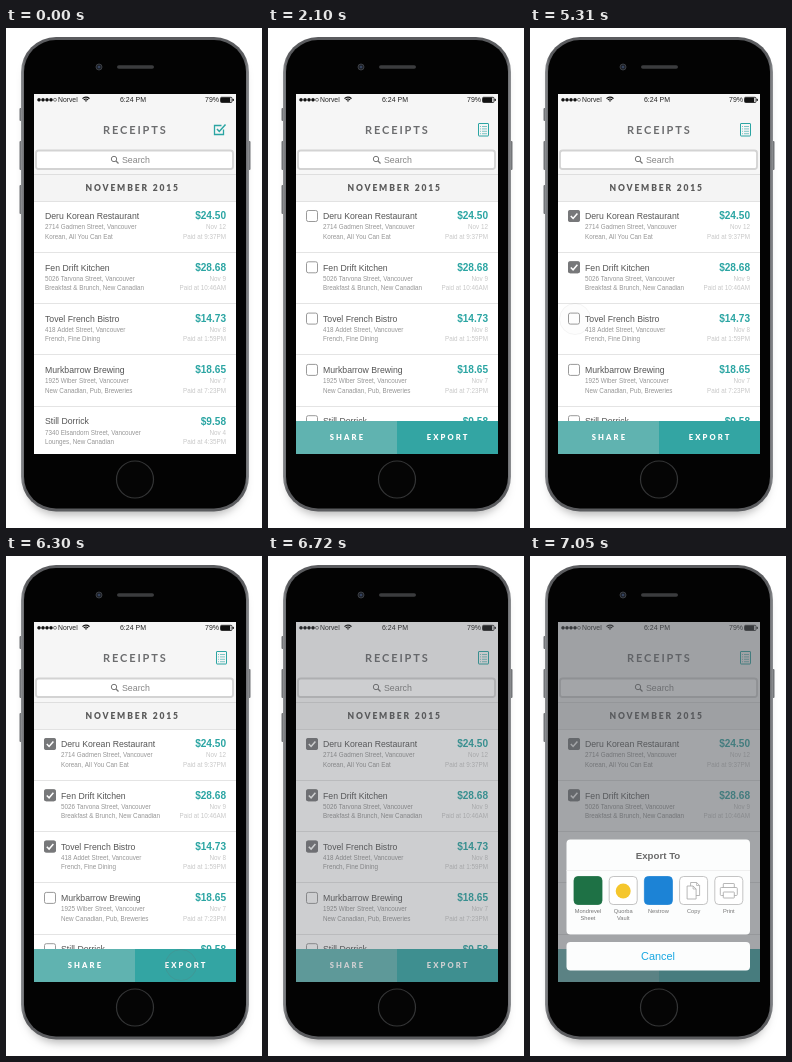
Animation of 256 by 500 pixels, one loop 8000 ms. Source, as an HTML page with a canvas:

```html
<!DOCTYPE html>
<html lang="en">
<head>
<meta charset="utf-8">
<title>Receipts</title>
<style>
  html, body { margin: 0; width: 100%; height: 100%; overflow: hidden; background: #fff; }
  canvas { display: block; width: 256px; height: 500px; }
</style>
</head>
<body>
<canvas id="stage"></canvas>
<script>
const W = 256, H = 500, LOOP = 8000, STEP = 30;
const SANS = '"Liberation Sans", Arial, sans-serif';
const CAPS = 'Lato, sans-serif';
const TEAL = '#2ba5a3';
const LEFT = 28, RIGHT = 230, TOP = 66, BOTTOM = 426, MID = 129;
const ROW_TOP = 173, ROW_H = 51.3;

const receipts = [
  ['Deru Korean Restaurant', '2714 Gadmen Street, Vancouver', 'Korean, All You Can Eat', '$24.50', 'Nov 12', '9:37PM'],
  ['Fen Drift Kitchen', '5026 Tarvona Street, Vancouver', 'Breakfast & Brunch, New Canadian', '$28.68', 'Nov 9', '10:46AM'],
  ['Tovel French Bistro', '418 Addet Street, Vancouver', 'French, Fine Dining', '$14.73', 'Nov 8', '1:59PM'],
  ['Murkbarrow Brewing', '1925 Wiber Street, Vancouver', 'New Canadian, Pub, Breweries', '$18.65', 'Nov 7', '7:23PM'],
  ['Still Dorrick', '7340 Elsandorn Street, Vancouver', 'Lounges, New Canadian', '$9.58', 'Nov 4', '4:35PM']
];

// Each tap: centre, fade-in start and end, fade-out start and end
const taps = [
  { x: 213, y: 102, r: 16.5, in: [1469, 1470], out: [1650, 1770] },
  { x: 45.5, y: 189.5, r: 16, in: [3510, 3600], out: [3720, 3870] },
  { x: 45, y: 240, r: 16, in: [4380, 4470], out: [4620, 4800] },
  { x: 45, y: 291, r: 16, in: [5280, 5370], out: [5520, 5700] },
  { x: 175, y: 409, r: 16, in: [6150, 6300], out: [6420, 6570] }
];

const canvas = document.getElementById('stage');
const ctx = canvas.getContext('2d');
const dpr = window.devicePixelRatio || 1;
canvas.width = W * dpr;
canvas.height = H * dpr;

const ramp = (t, a, b) => Math.min(1, Math.max(0, (t - a) / (b - a)));
const smooth = (t, a, b) => {
  const u = ramp(t, a, b);
  return u * u * (3 - 2 * u);
};

function text(s, x, y, size, color, { align = 'left', weight = 400, family = SANS, gap = 0 } = {}) {
  ctx.font = `${weight} ${size}px ${family}`;
  ctx.letterSpacing = gap + 'px';
  ctx.textAlign = align;
  ctx.fillStyle = color;
  ctx.fillText(s, x, y);
}

function paint(fill, stroke, width = 1) {
  if (fill) { ctx.fillStyle = fill; ctx.fill(); }
  if (stroke) { ctx.strokeStyle = stroke; ctx.lineWidth = width; ctx.stroke(); }
}

function box(x, y, w, h, r, fill, stroke, width) {
  ctx.beginPath();
  ctx.roundRect(x, y, w, h, r);
  paint(fill, stroke, width);
}

function disc(x, y, r, fill, stroke, width) {
  ctx.beginPath();
  ctx.arc(x, y, r, 0, Math.PI * 2);
  paint(fill, stroke, width);
}

function line(points, color, width = 1) {
  ctx.beginPath();
  points.forEach(([x, y]) => ctx.lineTo(x, y));
  paint(null, color, width);
}

const band = (y, h, color) => box(LEFT, y, RIGHT - LEFT, h, 0, color);

function faded(alpha, draw) {
  if (alpha <= 0) return;
  ctx.save();
  ctx.globalAlpha *= alpha;
  draw();
  ctx.restore();
}

function drawPhone() {
  for (const [x, y, h] of [[13.5, 80, 13], [13.5, 113, 29], [13.5, 157, 29], [241.5, 113, 29]]) {
    box(x, y, 3, h, 1, '#77797c');
  }
  ctx.save();
  ctx.shadowColor = 'rgba(0,0,0,.28)';
  ctx.shadowBlur = 9 * dpr;
  ctx.shadowOffsetY = 5 * dpr;
  box(20, 16, 218, 466, 32, '#555');
  ctx.restore();

  const rim = ctx.createLinearGradient(15, 0, 243, 0);
  rim.addColorStop(0, '#8e9093');
  rim.addColorStop(.02, '#5b5c5f');
  rim.addColorStop(.98, '#5b5c5f');
  rim.addColorStop(1, '#8e9093');
  box(15, 9, 228, 474.5, 35, rim);
  box(18, 12, 222, 468.5, 32, '#030303');

  disc(93, 39, 3, '#1d2026', '#3f4249', .9);
  disc(93, 39, 1.3, '#34425e');
  box(111, 37.2, 37, 3.6, 1.8, '#3b3c3e');
  disc(MID, 451.5, 18.5, '#050505', '#343536', 1.2);
}

function drawStatus() {
  for (let i = 0; i < 5; i++) {
    disc(33 + i * 4, 71.8, 1.5, i < 4 ? '#111' : null, '#111', .5);
  }
  text('Norvel', 52, 74.2, 6.8, '#222');
  for (const r of [1.2, 3, 4.8]) {
    ctx.beginPath();
    ctx.arc(80, 74, r, -Math.PI * .76, -Math.PI * .24);
    paint(null, '#111', 1.2);
  }
  text('6:24 PM', 127, 74.2, 7, '#222', { align: 'center' });
  text('79%', 199, 74.2, 7, '#222');
  box(214.5, 69.3, 11.5, 5.2, 1, null, '#111', .8);
  box(214.8, 69.6, 9.4, 4.6, .4, '#111');
  box(226.6, 70.8, 1.2, 2.2, .5, '#111');
}

function editIcon() {
  line([[217.5, 101.5], [217.5, 106.5], [208.5, 106.5], [208.5, 97.5], [215.5, 97.5]], TEAL, 1.3);
  line([[211, 101], [213.3, 103.5], [219.5, 96.5]], TEAL, 1.5);
}

function listIcon() {
  box(210.5, 95.5, 10, 12.5, .5, null, TEAL, 1);
  for (let y = 98.5; y < 107; y += 2.4) {
    line([[212, y], [213, y]], TEAL, .6);
    line([[214, y], [219, y]], TEAL, .6);
  }
}

function drawHeader(edit) {
  band(TOP, 81, '#f6f6f6');
  drawStatus();
  text('RECEIPTS', 97, 106.2, 11, '#6c6d6f', { weight: 700, family: CAPS, gap: 1.9 });
  faded(1 - edit, editIcon);
  faded(edit, listIcon);

  box(30, 122.5, 197, 18.5, 2.5, '#fff', '#d3d3d3', 1.8);
  disc(108, 131, 2.7, null, '#777', 1);
  line([[110, 133], [112.5, 135.5]], '#777', 1.2);
  text('Search', 116, 135, 8.8, '#858585');

  band(146, 27, '#f4f4f4');
  band(146, 1, '#dedede');
  band(173, 1, '#e2e2e2');
  text('NOVEMBER 2015', 79.5, 163, 8.5, '#5a5a5a', { weight: 900, family: CAPS, gap: 1.85 });
}

function checkbox(x, y, checked) {
  box(x, y, 11, 11, 1.8, '#fff', '#9a9a9a', 1);
  faded(checked, () => {
    box(x - .5, y - .5, 12, 12, 2, '#77787a');
    line([[x + 2.3, y + 5.6], [x + 4.6, y + 8], [x + 8.9, y + 3]], '#fff', 1.5);
  });
}

function drawRow([name, street, tags, price, date, time], i, edit, checked) {
  const y = ROW_TOP + i * ROW_H;
  const x = 39 + 16 * edit;
  const right = { align: 'right' };
  faded(edit, () => checkbox(x - 16.5, y + 9.5, checked));
  text(name, x, y + 18.2, 8.7, '#555');
  text(street, x, y + 28.4, 6.3, '#969696');
  text(tags, x, y + 37.6, 6.3, '#969696');
  text(price, 220, y + 18.4, 10.1, TEAL, { align: 'right', weight: 700 });
  text(date, 220, y + 28.4, 6.3, '#c8c8c8', right);
  text('Paid at ' + time, 220, y + 37.6, 6.3, '#c8c8c8', right);
  band(Math.floor(y + ROW_H), 1, '#e4e4e4');
}

function drawActions(edit) {
  const y = BOTTOM - 33 * edit;
  const style = { weight: 900, family: CAPS, gap: 2.1 };
  box(LEFT, y, MID - LEFT, 33, 0, '#60b3b0');
  box(MID, y, RIGHT - MID, 33, 0, '#33a5a3');
  text('SHARE', 61.8, y + 19, 7.6, '#fff', style);
  text('EXPORT', 158.8, y + 19, 7.6, '#fff', style);
}

function drawTap(tap, t) {
  faded(ramp(t, ...tap.in) * (1 - ramp(t, ...tap.out)), () => {
    disc(tap.x, tap.y, tap.r - .5, 'rgba(120,120,120,.04)', 'rgba(110,110,110,.22)', .9);
  });
}

function copyIcon(x, y) {
  const page = (px, py) => {
    ctx.beginPath();
    [[0, 0], [6, 0], [9, 3], [9, 13], [0, 13]].forEach(([a, b]) => ctx.lineTo(px + a, py + b));
    ctx.closePath();
    paint('#fff', '#a5a5a5', .8);
    line([[px + 6, py], [px + 6, py + 3], [px + 9, py + 3]], '#a5a5a5', .7);
  };
  page(x + 11, y + 6);
  page(x + 7.5, y + 9.5);
}

function printIcon(x, y) {
  box(x + 8.5, y + 7, 11, 6, .5, '#fff', '#a5a5a5', .8);
  box(x + 5.5, y + 11, 17, 8, 1, '#fff', '#a5a5a5', .8);
  box(x + 8.5, y + 15.5, 11, 6, .5, '#fff', '#a5a5a5', .8);
}

function drawSheet(rise) {
  const top = 425.5 - 142 * rise;
  const center = { align: 'center' };
  box(36.5, top, 183.5, 95, 4, '#fcfdfd');
  text('Export To', 128, top + 19.3, 9.7, '#6b6b6b', { align: 'center', weight: 700 });
  line([[36.5, top + 31], [220, top + 31]], '#ececec', .8);

  const targets = [
    { label: ['Mondrevel', 'Sheet'], fill: '#1e7145' },
    { label: ['Quorba', 'Vault'], icon: (x, y) => disc(x + 14, y + 14.5, 7.5, '#f5c62c') },
    { label: ['Nestrow'], fill: '#1c83d6' },
    { label: ['Copy'], icon: copyIcon },
    { label: ['Print'], icon: printIcon }
  ];
  targets.forEach(({ label, fill, icon }, i) => {
    const x = 44 + i * 35.2, y = top + 37;
    box(x, y, 28, 28, 4, fill || '#fff', fill || '#b5b5b5', .8);
    if (icon) icon(x, y);
    label.forEach((s, n) => text(s, x + 14, top + 73.8 + n * 6.6, 5.7, '#777', center));
  });

  box(36.5, top + 102.5, 183.5, 28.5, 4, '#fcfdfd');
  text('Cancel', 128, top + 120.5, 10.9, '#18a7e2', center);
}

function drawScreen(t) {
  const edit = smooth(t, 1630, 2100);
  const checks = [ramp(t, 3720, 3870), ramp(t, 4620, 4800), ramp(t, 5520, 5700)];
  const dim = smooth(t, 6540, 6880);
  const rise = smooth(t, 6735, 7050);

  ctx.save();
  ctx.beginPath();
  ctx.rect(LEFT, TOP, RIGHT - LEFT, BOTTOM - TOP);
  ctx.clip();
  band(TOP, BOTTOM - TOP, '#fff');
  receipts.forEach((r, i) => drawRow(r, i, edit, checks[i] || 0));
  drawHeader(edit);
  if (edit > 0) drawActions(edit);
  taps.forEach(tap => drawTap(tap, t));
  faded(dim, () => band(TOP, BOTTOM - TOP, 'rgba(88,92,98,.55)'));
  if (rise > 0) drawSheet(rise);
  ctx.restore();
}

function render(t) {
  ctx.setTransform(dpr, 0, 0, dpr, 0, 0);
  ctx.fillStyle = '#fff';
  ctx.fillRect(0, 0, W, H);
  drawPhone();
  drawScreen(t);
}

const start = performance.now();
function tick() {
  const t = (performance.now() - start) % LOOP;
  render(Math.floor(t / STEP) * STEP);
  requestAnimationFrame(tick);
}
tick();
</script>
</body>
</html>
```
